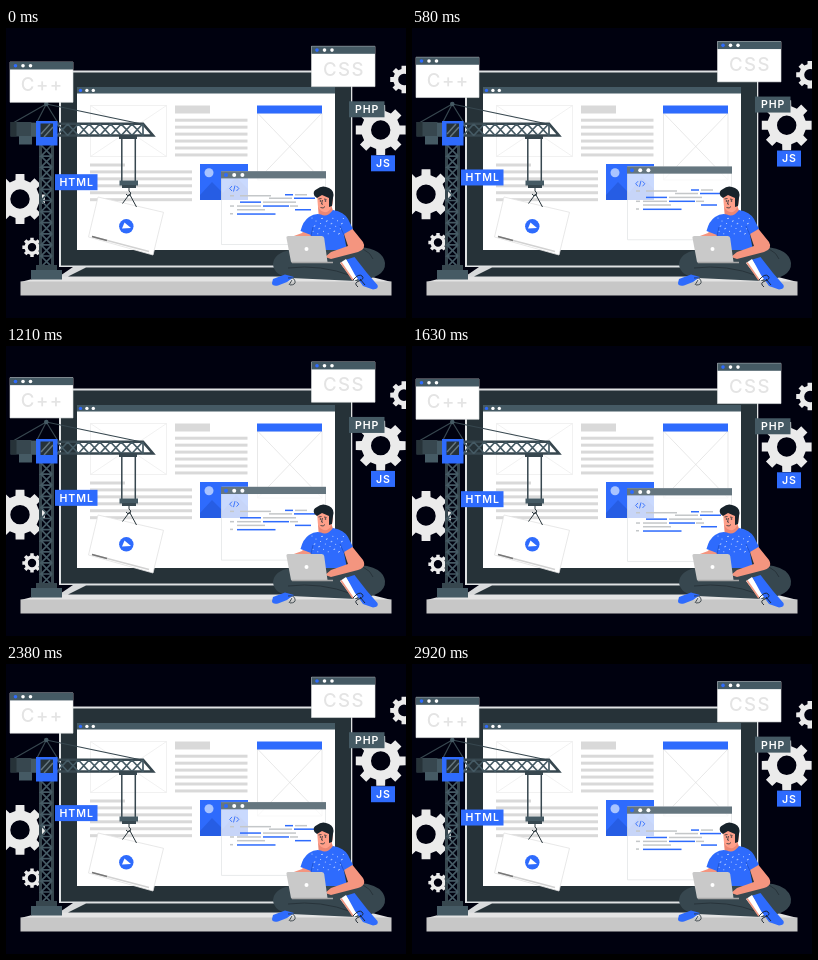
Animation, 400 px wide and 290 px high, one loop 2960 ms. Source, as an HTML page:

```html
<!DOCTYPE html>
<html lang="en">
<head>
<meta charset="utf-8">
<title>Website under construction</title>
<style>
html, body { margin: 0; width: 100%; height: 100%; overflow: hidden; background: #00010f; }
svg { display: block; width: 100vw; height: 100vh; }
text { font-family: Inter, "Open Sans", sans-serif; text-anchor: middle; }
.tag { font-size: 10.6px; font-weight: 600; fill: #fff; letter-spacing: .9px; }
.name { font-size: 18.6px; font-weight: 500; fill: #e4e4e4; letter-spacing: 1.4px; }
</style>
</head>
<body>
<svg viewBox="0 0 400 290">
  <g id="gears" class="floating" fill="#ebebeb" fill-rule="evenodd"></g>

  <!-- platform -->
  <path d="M38 248H362L385.5 254H14.5Z" fill="#e4e4e4"/>
  <path d="M14.5 253.5h371v14h-371z" fill="#c7c7c7"/>

  <!-- monitor -->
  <path d="M53 239V46q0-3.500 3.500-3.500H343q3.300 0 3.300 3.500V239Z" fill="#dfe2e3"/>
  <path d="M55 237.500V47q0-2.500 2.500-2.500H342.500q2.500 0 2.500 2.500V237.500Z" fill="#263238"/>
  <path d="M67 239H332L346 248.500H53Z" fill="#d8dadb"/>
  <path d="M80 239.500H322L345 248.500H62Z" fill="#263238"/>
  <path d="M71 59H329V222H71Z" fill="#fff"/>
  <path d="M71 59H329V65.500H71Z" fill="#455a64"/>
  <g id="page"></g>

  <!-- picture placeholder -->
  <path d="M194 136h48v36h-48z" fill="#2e6bfd"/>
  <path d="M194 172V167L206 154L217 165L230 149L242 161V172Z" fill="#2357d8" opacity=".65"/>
  <circle cx="203" cy="144.800" r="4.500" fill="#a9c4ff"/>

  <g id="code" class="floating"></g>

  <!-- hanging card -->
  <path d="M92 169L157.500 184.300L147 227L82.500 209Z" fill="#fff" stroke="#e2e2e2" stroke-width=".8"/>
  <path d="M86 208.500L143 223.500" stroke="#d2d2d2" stroke-width="1.600"/>
  <path d="M86 208.500L101 212.500" stroke="#777" stroke-width="1.300"/>
  <circle cx="120.300" cy="198.300" r="7.200" fill="#2e6bfd"/>
  <path d="M116 200.500L118.500 194.500L125 200Z" fill="#fff"/>

  <g id="crane"></g>

  <!-- developer -->
  <g>
    <path d="M284 222Q268 225 267 236Q268 248 285 250L350 253Q380 250 379 235Q377 221 354 219L330 222Z" fill="#37474f"/>
    <path d="M282 240Q315 236 346 248M357 221Q365 225 367 231" fill="none" stroke="#263238" stroke-width=".9"/>
    <path d="M267 251L279 246.500L288 249L281 254L272 257.500Q266 258.500 266 255Z" fill="#2e6bfd"/>
    <path d="M282 250q6-1 7 3t-5 4M286 252l-3 5" fill="none" stroke="#263238" stroke-width=".8"/>
    <path d="M334 235L340 231L354 250L348 253Z" fill="#fff"/>
    <path d="M335 234.500L347 252" stroke="#f29a85" stroke-width="1.600"/>
    <path d="M340.500 231.500L348.500 229L361 245L371.500 257Q373 261 367 261.500L357 258L349 247Z" fill="#2e6bfd"/>
    <path d="M347 252q6-7 9-4t-3 5t-1 6M354 251l5 6" fill="none" stroke="#17202a" stroke-width=".9"/>
    <path d="M303 196L296 205L286.500 208.500L291 216L307 211Z" fill="#f4957f"/>
    <path d="M312 179L325 177L329 188L313 191Z" fill="#ec8773"/>
    <path d="M303 189Q309 185 315 186.500Q321 190 327 182Q338 184 342 191L347 201L338 207L341 222H307L305 207L294.500 203Q297 193 303 189Z" fill="#2e6bfd"/>
    <path d="M338 206L346.500 201L357 214Q361 221 352 224L325 231L319 229L325 224L342 218Z" fill="#f4957f"/>
    <path d="M338 207L334 198M305 208L307 199" stroke="#1f51c7" stroke-width=".8"/>
    <g id="specks" fill="#dce8ff"></g>
    <path d="M311 167L312 179Q315 185 321 184Q327 181 327 171L325 165Z" fill="#ff9f89"/>
    <path d="M308.500 168Q306 163 311 161Q316 156.500 323 160Q329 163 327 170L326 178L323 179L323 170L316 167L311 170Z" fill="#18232b"/>
    <path d="M312.500 171l3-.5M318 171l2.500 .5M316.500 172l-1 4 1.500.3M314.500 179.500q3 1.500 4.500-1" fill="none" stroke="#263238" stroke-width=".8"/>
    <circle cx="314.500" cy="173" r=".8" fill="#263238"/><circle cx="319.500" cy="173" r=".8" fill="#263238"/>
    <path d="M280.500 210Q280 208 282.500 208H315.500Q317.800 208 318.200 210L321.500 234H285Z" fill="#c9c9c9"/>
    <path d="M285 233.800H327V235.300H286Z" fill="#a6a6a6"/>
    <circle cx="300.500" cy="221" r="2" fill="#fff"/>
  </g>

  <g id="labels" class="floating"></g>
</svg>
<script>
const BLUE = '#2e6bfd', SLATE = '#455a64', DARK = '#37474f', INK = '#263238';
const LOOP = 2960, FLOAT_PERIOD = 1500, FLOAT_HEIGHT = 6.1, FRAME = 1000 / 24;
const $ = id => document.getElementById(id);
const rect = (x, y, w, h, fill) => `<rect x="${x}" y="${y}" width="${w}" height="${h}" fill="${fill}"/>`;
const path = (d, width = 1, color = SLATE) =>
  `<path d="${d}" fill="none" stroke="${color}" stroke-width="${width}"/>`;
const dots = (x, y, gap, r) => [0, 1, 2].map(i =>
  `<circle cx="${x + i * gap}" cy="${y}" r="${r}" fill="${i ? '#fff' : BLUE}"/>`).join('');
const textLines = (x, y, w, count) =>
  Array.from({ length: count }, (_, i) => rect(x, y + i * 6.95, w, 3, '#d9d9d9')).join('');

function gear(cx, cy, r, hole) {
  const points = [];
  for (let i = 0; i < 8; i++) {
    for (const [offset, radius] of [[-.235, .77], [-.175, 1], [.175, 1], [.235, .77]]) {
      const a = i * Math.PI / 4 + offset;
      points.push(`${(cx + r * radius * Math.cos(a)).toFixed(2)} ${(cy + r * radius * Math.sin(a)).toFixed(2)}`);
    }
  }
  return `<path d="M${points.join('L')}Z M${cx - hole} ${cy}a${hole} ${hole} 0 1 0 ${2 * hole} 0a${hole} ${hole} 0 1 0 ${-2 * hole} 0"/>`;
}

function placeholder(x, y, w, h, color) {
  return path(`M${x} ${y}h${w}v${h}h${-w}zl${w} ${h}m0 ${-h}l${-w} ${h}`, .7, color);
}

function page() {
  return dots(74.5, 62.4, 6.4, 1.7)
    + placeholder(84.5, 77.5, 76, 51, '#ebebeb') + placeholder(251.5, 85, 64.5, 67, '#dedede')
    + rect(169, 77.5, 35, 8, '#d9d9d9') + rect(251, 77.5, 65, 8, BLUE)
    + textLines(169, 90.7, 72.5, 6)
    + textLines(84, 135.5, 35, 1) + textLines(84, 142.4, 102, 5);
}

function code() {
  const gray = '#c4c7c9';
  const lines = [
    [279, 166, 8, BLUE], [289, 166, 12, gray],
    [224, 167, 4, gray], [234, 167, 31, gray],
    [288, 169.5, 21, BLUE], [263, 169.5, 23, gray],
    [234, 173.4, 21, BLUE], [257, 173.4, 33, gray],
    [224, 177.3, 4, gray], [231, 177.3, 24, gray], [257, 177.3, 26, BLUE], [284, 177.3, 8, gray],
    [289, 181, 16, BLUE], [231, 181, 28, gray],
    [224, 185, 3, gray], [231, 185.3, 38.5, BLUE]
  ];
  return '<path d="M215.500 143.500h104v73h-104z" fill="#fff" fill-opacity=".74" stroke="#e0e2e4" stroke-width=".7"/>'
    + rect(215, 143.2, 105, 7.2, '#65767f') + dots(220, 147, 8.2, 2)
    + path('M226 158l-2.300 2.500 2.300 2.500M230.500 158l2.300 2.500-2.300 2.500M229 157.500l-1.500 6', .9, BLUE)
    + lines.map(([x, y, w, c]) => rect(x, y, w, 1.5, c)).join('');
}

function lattice(x, y, w, h, count, vertical) {
  let d = '';
  for (let i = 0; i < count; i++) {
    d += vertical
      ? `M${x} ${y + i * h}l${w} ${h}m0 ${-h}l${-w} ${h}h${w}`
      : `M${x + i * w} ${y}l${w} ${h}m0 ${-h}l${-w} ${h}`;
  }
  return d;
}

function crane() {
  return path('M40.300 76L7 95M40.300 76L52 95M40.300 76L31 94M40.300 76L138 96.500', 1.2, DARK)
    + `<circle cx="40.300" cy="76" r="2.300" fill="${SLATE}"/>`
    + path('M34.500 116V240M46.500 116V240', 3, DARK)
    + path(lattice(35, 117, 11, 11.1, 11, true), 1.7)
    + rect(30, 237, 21, 6, DARK) + rect(25, 242, 31, 9.5, SLATE)
    + path('M24 95.800H137L147 107.500H24', 2.6, DARK)
    + path(lattice(51, 96, 10.7, 11.5, 8, false) + 'M137 96V108', 1.7)
    + rect(4.5, 94, 21, 14.5, DARK) + rect(13, 108, 13, 8.5, SLATE) + rect(4.5, 94, 6, 14.5, INK)
    + rect(25, 95, 6, 13.5, SLATE)
    + rect(30, 93, 21.5, 24.5, BLUE) + rect(34.5, 95.5, 12.5, 13.5, INK)
    + path('M35 106L44 96M38 109L47 99', 1.5, '#65767f')
    + rect(113, 107, 18, 4, DARK)
    + path('M115.800 110V153M129.300 110V153', 1.5, DARK)
    + rect(113.5, 152.5, 18.5, 5, SLATE) + rect(116, 157, 14, 3, DARK)
    + path('M123 160v3q3 2 1 4t-4-1M123.500 166L116.500 175.500M123.500 166L130.500 179', 1, INK);
}

function specks() {
  let out = '';
  for (let i = 0; i < 30; i++) {
    const x = 306 + (i * .618 % 1) * 32, y = 190 + (i * .287 % 1) * 18;
    out += `<circle cx="${x.toFixed(1)}" cy="${y.toFixed(1)}" r=".5"/>`;
  }
  return out;
}

function browser(x, y, w, label) {
  return rect(x, y, w, 40.3, '#fff')
    + path(`M${x} ${y}h${w}v40.300h${-w}z`, .6, '#dfe2e3')
    + rect(x, y, w, 7.5, SLATE) + dots(x + 5.5, y + 3.8, 7.5, 1.8)
    + `<text class="name" x="${x + w / 2 + .7}" y="${y + 29.3}">${label}</text>`;
}

function tag(x, y, w, label, fill) {
  return rect(x, y, w, 16, fill) + `<text class="tag" x="${x + w / 2 + .4}" y="${y + 11.9}">${label}</text>`;
}

$('gears').innerHTML = gear(14, 171, 25.3, 9.7) + gear(374.7, 102, 25.3, 9.7)
  + gear(26, 219.3, 9.8, 4.2) + gear(398, 51.5, 14, 5.8);
$('page').innerHTML = page();
$('code').innerHTML = code();
$('crane').innerHTML = crane();
$('specks').innerHTML = specks();
$('labels').innerHTML = browser(4, 34, 63, 'C++') + browser(305.5, 18.3, 63.5, 'CSS')
  + tag(49, 146.2, 42.5, 'HTML', BLUE) + tag(343, 73.3, 35.5, 'PHP', SLATE) + tag(365, 127.3, 24, 'JS', BLUE);

const floating = document.querySelectorAll('.floating');

function draw(ms) {
  const t = Math.floor((ms % LOOP + 5) / FRAME) * FRAME;
  const phase = t % FLOAT_PERIOD / FLOAT_PERIOD;
  const lift = FLOAT_HEIGHT * (1 - Math.abs(1 - 2 * phase));
  for (const group of floating) group.setAttribute('transform', `translate(0 ${-lift.toFixed(3)})`);
}

const start = performance.now();
function tick() {
  draw(performance.now() - start);
  requestAnimationFrame(tick);
}
tick();
</script>
</body>
</html>
```
